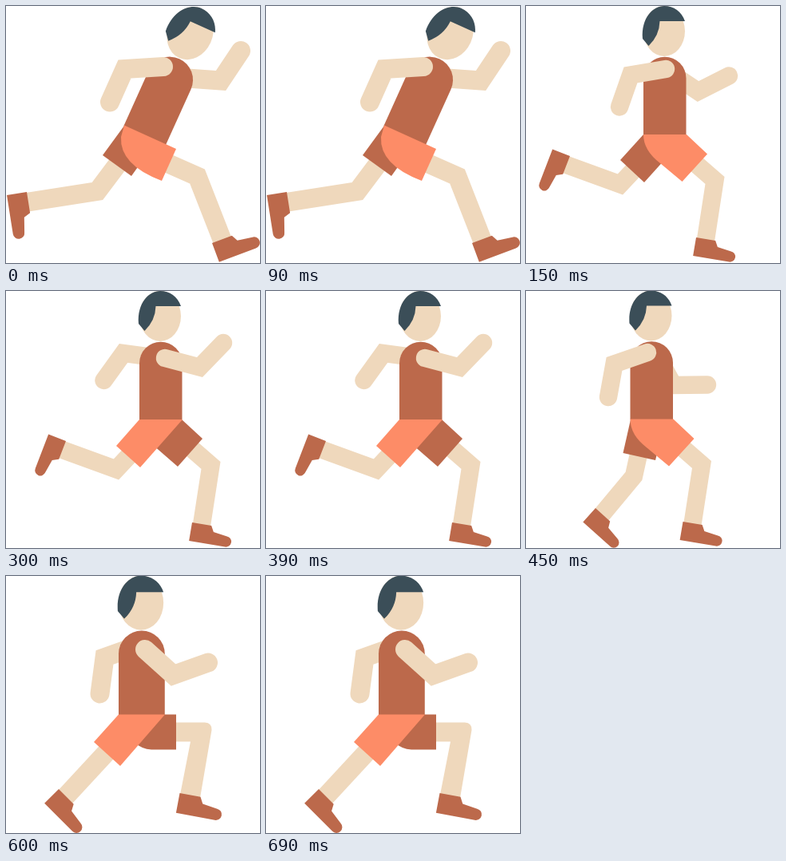
Animation of 318x322 px, one loop 750 ms. Source, as an HTML page:

```html
<!DOCTYPE html>
<html lang="en">
<head>
<meta charset="utf-8">
<title>Runner</title>
<style>
  html, body { margin: 0; width: 100%; height: 100%; overflow: hidden; background: #fff; }
  svg { display: block; width: 318px; height: 322px; }

  .pose {
    visibility: hidden;
    animation: show 750ms step-end infinite;
    animation-delay: calc(var(--i) * 150ms - 750ms);
  }
  @keyframes show {
    0% { visibility: visible; }
    20%, 100% { visibility: hidden; }
  }

  .arm, .leg { fill: none; stroke: #efd8bc; stroke-width: 22.4px; stroke-miterlimit: 8; }
  .arm { stroke-linecap: round; }
  .big .arm, .big .leg { stroke-width: 24px; }
  .skin { fill: #efd8bc; }
  .dark { fill: #bc694b; }
  .light { fill: #fd8c67; }
  .hair { fill: #3b4e58; }
</style>
</head>
<body>
<svg viewBox="0 0 318 322">
  <defs>
    <!-- origin: back of the waist -->
    <g id="body">
      <path class="dark" d="M0 .5V-70.5A26.75 26.75 0 0 1 53.5 -70.5V.5Z"/>
      <g transform="translate(20 -142)">
        <ellipse class="skin" cx="6" cy="12.5" rx="26" ry="31.5"/>
        <path class="hair" d="M32 0H0.500Q0 18 -13.500 31L-21 22C-23 -4 -8 -19 6 -19C18 -19 28 -12 32 0Z"/>
      </g>
    </g>
    <!-- origin: back of the ankle -->
    <path id="shoe" class="dark" d="M0 0H24.500L28.500 7.500L46 10A6.7 6.7 0 0 1 45.500 23.400H0Z"/>
    <path id="shorts" class="light" d="M0 0H54L80 24.500L48.500 59L21 36Q0 20 0 0Z"/>
    <g id="frontLeg">
      <polyline class="leg" points="205,191 236.500,218.500 225,293"/>
      <use href="#shoe" transform="translate(213 290) rotate(9.500)"/>
    </g>
    <g id="backLeg">
      <polyline class="leg" points="140,200 118,223.500 48,198"/>
      <use href="#shoe" transform="translate(55 188) rotate(111)"/>
    </g>
  </defs>

  <g class="pose big" style="--i:0">
    <polyline class="arm" points="220,90 269,93.500 294,56"/>
    <polyline class="leg" points="140,198 114.500,232 25,246"/>
    <use href="#shoe" transform="translate(26 233) rotate(81) scale(1.08)"/>
    <polyline class="leg" points="200,196 239.500,213.500 271,294"/>
    <use href="#shoe" transform="translate(258 297) rotate(-20.500) scale(1.08)"/>
    <use href="#body" transform="translate(147.500 150) rotate(24.300) scale(1.08)"/>
    <path class="dark" d="M148 150L121 187L157 213L172 192Z"/>
    <path class="light" d="M148 149.500L213 179L195 219Q142 199 144 164Z"/>
    <polyline class="arm" points="197,76 148.500,79 130,120.500"/>
  </g>

  <g class="pose" style="--i:1">
    <polyline class="arm" points="190,90 215.500,107 254,87.500"/>
    <use href="#backLeg"/>
    <use href="#frontLeg"/>
    <use href="#body" x="147" y="161"/>
    <path class="dark" d="M147 161L118 193L148 221L175 191Z"/>
    <use href="#shorts" x="147" y="161"/>
    <polyline class="arm" points="175,79 131,86.500 117,126.500"/>
  </g>

  <g class="pose" style="--i:2">
    <polyline class="arm" points="185,83 147,78 122.500,112"/>
    <use href="#backLeg" x="20"/>
    <use href="#frontLeg" x="20"/>
    <use href="#body" x="167" y="161"/>
    <path class="dark" d="M220 161L246 185L215 220L184 193Z"/>
    <path class="light" d="M167 161H221L168 221L138 194Z"/>
    <polyline class="arm" points="199,84 242.500,95.500 272,65"/>
  </g>

  <g class="pose" style="--i:3">
    <polyline class="arm" points="172,95 184.500,118 227,117.500"/>
    <polyline class="leg" points="142,200 135,232 95,280"/>
    <use href="#shoe" transform="translate(87 272) rotate(42)"/>
    <use href="#frontLeg" x="-16.500" y="-1"/>
    <use href="#body" x="130.500" y="160.500"/>
    <path class="dark" d="M131 161L121.500 203L162 212L170 180Z"/>
    <use href="#shorts" x="130.500" y="160.500"/>
    <polyline class="arm" points="152,77 110.500,91.500 103,133"/>
  </g>

  <g class="pose big" style="--i:4">
    <polyline class="arm" points="160,89 123.500,102 117.500,147.500"/>
    <polyline class="leg" points="135,211 74,277"/>
    <use href="#shoe" transform="translate(66 267) rotate(45) scale(1.08)"/>
    <path class="skin" d="M200 183.500H249Q258 184 257.500 193L243 278L218 274L231 207.500H200Z"/>
    <use href="#shoe" transform="translate(217.500 272) rotate(10.500) scale(1.08)"/>
    <use href="#body" transform="translate(141 173.500) scale(1.08)"/>
    <path class="dark" d="M190 173.500H213V217.500H182Q170 217 160 208Z"/>
    <path class="light" d="M141 173.500H199L143 238L110 208Z"/>
    <polyline class="arm" points="174,92 209.500,124 253,108.500"/>
  </g>
</svg>
</body>
</html>
```
